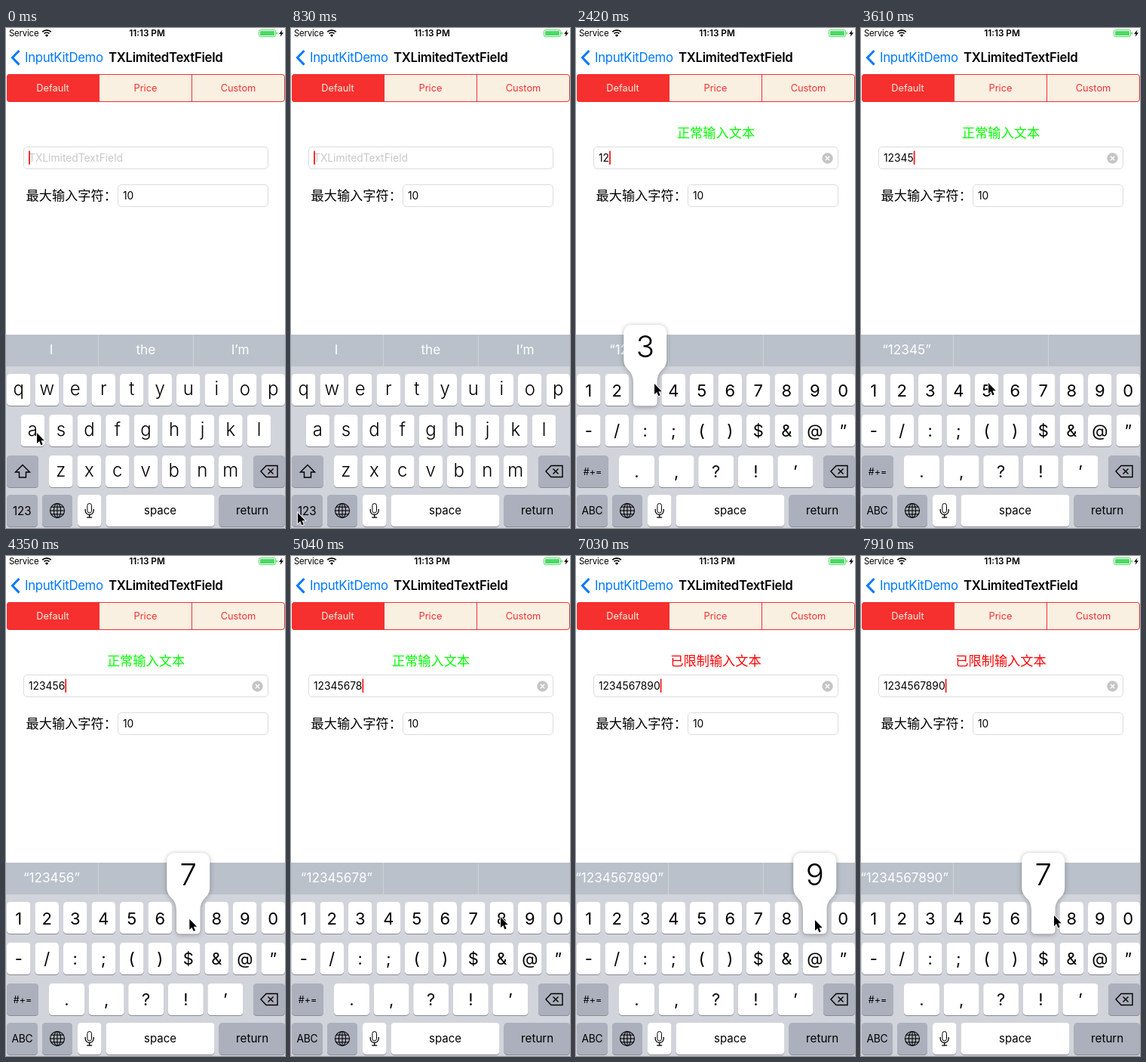
An HTML page with a canvas for the animation above (8 s loop, 370x662 px).

```html
<!DOCTYPE html>
<html lang="en">
<head>
<meta charset="utf-8">
<title>Limited text field</title>
<style>
  html, body { margin: 0; width: 100%; height: 100%; overflow: hidden; background: #fff; }
  canvas { display: block; width: 370px; height: 662px; }
</style>
</head>
<body>
<canvas id="stage"></canvas>
<script>
const W = 370, H = 662, LOOP = 8000;
const canvas = document.getElementById('stage');
const ctx = canvas.getContext('2d');
const dpr = window.devicePixelRatio || 1;
canvas.width = W * dpr;
canvas.height = H * dpr;

const LATIN = 'Inter, sans-serif';
const HAN = '"Noto Sans CJK SC", "Noto Sans CJK", sans-serif';
const RED = '#f5302f', BLUE = '#007aff', INK = '#000';
const SYMBOLS_AT = 1050, LIMIT = 10, KEY_W = 31.5, PITCH = 37.5;

// Key, touch down, touch up
const PRESSES = [
  ['1', 1600, 1700], ['2', 2060, 2180], ['3', 2380, 2520], ['4', 2900, 3020],
  ['5', 3370, 3470], ['6', 3920, 4020], ['7', 4300, 4420], ['8', 4780, 4890],
  ['9', 5330, 5440], ['0', 5780, 5900], ['9', 6900, 7010], ['8', 7340, 7460],
  ['7', 7860, 8100]
];

// Time, x, y of the pointer
const POINTER = [
  [30, 41, 536], [800, 9, 642], [1060, 9, 642], [1540, 22, 490], [1850, 22, 490],
  [2060, 66, 486], [2200, 66, 486], [2380, 104, 471], [2620, 104, 471],
  [2880, 136, 476], [3080, 137, 476], [3350, 169, 470], [3610, 169, 470],
  [3760, 187, 505], [3910, 208, 488], [4060, 208, 488], [4290, 243, 480],
  [4450, 244, 482], [4600, 262, 515], [4770, 278, 478], [5050, 278, 478],
  [5290, 312, 486], [5480, 313, 486], [5760, 349, 478], [6210, 349, 477],
  [6740, 317, 482], [7060, 317, 482], [7320, 286, 484], [7740, 286, 484],
  [7850, 256, 476], [8000, 256, 476]
];

const clamp01 = v => Math.max(0, Math.min(1, v));
const ease = v => { v = clamp01(v); return v * v * (3 - 2 * v); };
const mix = (a, b, p) => a + (b - a) * p;

function setFont(size, weight = 400, family = LATIN, tracking = 0) {
  ctx.font = `${weight} ${size}px ${family}`;
  ctx.letterSpacing = tracking + 'px';
}

function text(str, x, y, size, color = INK, { weight, family, tracking, align = 'center' } = {}) {
  setFont(size, weight, family, tracking);
  ctx.textAlign = align;
  ctx.fillStyle = color;
  ctx.fillText(str, x, y);
}

function box(x, y, w, h, r, fill, stroke) {
  ctx.beginPath();
  ctx.roundRect(x, y, w, h, r);
  if (fill) { ctx.fillStyle = fill; ctx.fill(); }
  if (stroke) { ctx.strokeStyle = stroke; ctx.lineWidth = 1; ctx.stroke(); }
}

function path(points, close) {
  ctx.beginPath();
  points.forEach(([x, y]) => ctx.lineTo(x, y));
  if (close) ctx.closePath();
}

function strokePath(points, color, width, close) {
  path(points, close);
  ctx.strokeStyle = color;
  ctx.lineWidth = width;
  ctx.stroke();
}

function cross(x, y, r, color, width) {
  strokePath([[x - r, y - r], [x + r, y + r]], color, width);
  strokePath([[x + r, y - r], [x - r, y + r]], color, width);
}

function statusBar() {
  text('Service', 4, 11.3, 11.4, INK, { align: 'left', tracking: -0.2 });
  ctx.strokeStyle = INK;
  ctx.lineWidth = 1.7;
  for (const r of [8.2, 5]) {
    ctx.beginPath();
    ctx.arc(54, 11, r, -Math.PI * 0.75, -Math.PI * 0.25);
    ctx.stroke();
  }
  ctx.fillStyle = INK;
  ctx.beginPath();
  ctx.moveTo(54, 11.8);
  ctx.arc(54, 11.8, 3, -Math.PI * 0.75, -Math.PI * 0.25);
  ctx.fill();
  text('11:13 PM', 187, 11.3, 11.8, INK, { weight: 600 });
  box(335.5, 2.5, 22, 9, 2, null, '#4cd964');
  box(337, 4, 19, 6, 0.5, '#4cd964');
  box(358.5, 5.5, 1.5, 3, 0.7, '#4cd964');
  path([[366.5, 2.5], [362, 7.8], [364.7, 7.8], [363.5, 11.8], [368, 6.3], [365.3, 6.3]], true);
  ctx.fillStyle = INK;
  ctx.fill();
}

function navigation() {
  strokePath([[17.5, 30], [8.5, 39.3], [17.5, 48.6]], BLUE, 3);
  text('InputKitDemo', 25, 45, 16.8, BLUE, { align: 'left', tracking: -0.35 });
  text('TXLimitedTextField', 136, 45, 16.8, INK, { align: 'left', weight: 600, tracking: -0.3 });
}

function segments() {
  box(1.5, 61.5, 368, 36, 3.5, '#f9f0e2', RED);
  box(1, 61, 122.5, 37, [4, 0, 0, 4], RED);
  ctx.fillStyle = RED;
  ctx.fillRect(123, 61, 1, 37);
  ctx.fillRect(246, 61, 1, 37);
  ['Default', 'Price', 'Custom'].forEach((name, i) =>
    text(name, 62 + i * 123, 84, 12.8, i ? RED : '#f9f0e2'));
}

function inputState(t) {
  const done = PRESSES.filter(p => p[2] <= t);
  return {
    value: done.slice(0, LIMIT).map(p => p[0]).join(''),
    limited: done.length > LIMIT,
    lastInput: done.length ? done[done.length - 1][2] : -450
  };
}

function caretAlpha(since) {
  const phase = since % 1000;
  return phase < 700 ? 1 - clamp01((phase - 580) / 120) : clamp01((phase - 880) / 120);
}

function form(t) {
  const { value, limited, lastInput } = inputState(t);
  box(23.5, 157.5, 324, 29, 4.5, '#fff', '#dcdcdc');
  box(148.5, 207.5, 199, 29, 4.5, '#fff', '#dcdcdc');
  text('最大输入字符：', 26.5, 228.3, 17.2, INK, { align: 'left', family: HAN });
  text('10', 155, 227, 13.8, INK, { align: 'left' });

  if (value) {
    text(limited ? '已限制输入文本' : '正常输入文本', 185.5, 145.2, 17.2,
      limited ? '#ff0000' : '#00ff00', { family: HAN });
    text(value, 30, 177, 13.8, INK, { align: 'left' });
    ctx.beginPath();
    ctx.arc(333.5, 172.5, 7.2, 0, Math.PI * 2);
    ctx.fillStyle = '#c5c5c8';
    ctx.fill();
    cross(333.5, 172.5, 2.7, '#fff', 1.3);
  } else {
    text('TXLimitedTextField', 30, 177, 13.8, '#c7c7cd', { align: 'left' });
  }

  setFont(13.8);
  const x = 30 + (value ? ctx.measureText(value).width : 0);
  ctx.globalAlpha = caretAlpha(t - lastInput);
  box(x, 162.5, 2, 18.5, 1, RED);
  ctx.globalAlpha = 1;
}

function suggestions(t) {
  ctx.fillStyle = '#bac1ca';
  ctx.fillRect(0, 406, W, 42);
  ctx.fillStyle = '#ced3d9';
  ctx.fillRect(122, 406, 1, 42);
  ctx.fillRect(248, 406, 1, 42);

  const { value } = inputState(t - 120);
  if (!value) {
    ['I', 'the', 'I’m'].forEach((word, i) => text(word, 60 + i * 125.3, 431.5, 17.2, '#fff'));
    return;
  }
  const quoted = `“${value}”`;
  if (value.length < LIMIT) {
    text(quoted, 60.5, 431.5, 17.2, '#fff');
    return;
  }
  // Too long for its slot: faded at the right edge, then scrolled to its end
  setFont(17.2);
  const p = ease((t - 6400) / 360);
  const x = mix(5, 116 - ctx.measureText(quoted).width, p);
  const fade = ctx.createLinearGradient(102, 0, 122, 0);
  fade.addColorStop(0, '#fff');
  fade.addColorStop(1, `rgba(255,255,255,${p})`);
  ctx.save();
  ctx.beginPath();
  ctx.rect(0, 406, 122, 42);
  ctx.clip();
  text(quoted, x, 431.5, 17.2, fade, { align: 'left' });
  ctx.restore();
}

function key(x, y, w, fill = '#fff') {
  box(x, y + 1, w, 42, 4.5, '#898c92');
  box(x, y, w, 42, 4.5, fill);
}

function keyRow(labels, x, y, { w = KEY_W, pitch = PITCH, size = 22, weight = 400, base = 29.5, hidden } = {}) {
  labels.forEach((label, i) => {
    key(x + i * pitch, y, w);
    if (label !== hidden) text(label, x + i * pitch + w / 2, y + base, size, INK, { weight });
  });
}

function globe(x, y) {
  ctx.strokeStyle = INK;
  ctx.lineWidth = 1.1;
  for (const rx of [9.5, 4.6]) {
    ctx.beginPath();
    ctx.ellipse(x, y, rx, 9.5, 0, 0, Math.PI * 2);
    ctx.stroke();
  }
  strokePath([[x, y - 9.5], [x, y + 9.5]], INK, 1.1);
  for (const [dy, r] of [[-4.8, 8.2], [0, 9.5], [4.8, 8.2]])
    strokePath([[x - r, y + dy], [x + r, y + dy]], INK, 1.1);
}

function microphone(x, y) {
  box(x - 2.8, y - 9.5, 5.6, 12.5, 2.8, null, INK);
  ctx.beginPath();
  ctx.moveTo(x - 5.5, y - 2);
  ctx.lineTo(x - 5.5, y);
  ctx.arc(x, y, 5.5, Math.PI, 0, true);
  ctx.lineTo(x + 5.5, y - 2);
  ctx.lineWidth = 1.3;
  ctx.stroke();
  strokePath([[x, y + 5.5], [x, y + 9]], INK, 1.3);
  strokePath([[x - 3.5, y + 9], [x + 3.5, y + 9]], INK, 1.3);
}

function keyboard(t, pressed) {
  const symbols = t >= SYMBOLS_AT;
  const gray = '#abb0bc';
  ctx.fillStyle = '#d1d4da';
  ctx.fillRect(0, 448, W, H - 448);

  if (symbols) {
    keyRow([...'1234567890'], 1, 458, { hidden: pressed });
    keyRow([...'-/:;()$&@”'], 1, 512, { base: 28.5 });
    keyRow([...'.,?!’'], 57, 566, { w: 47, pitch: 52.6, base: 28.5 });
  } else {
    const letters = { size: 24, weight: 300, base: 28 };
    keyRow([...'qwertyuiop'], 1, 458, letters);
    keyRow([...'asdfghjkl'], 19.7, 512, letters);
    keyRow([...'zxcvbnm'], 57, 566, letters);
  }

  key(1, 566, 42, gray);
  if (symbols) {
    text('#+=', 22, 591.5, 12.5);
  } else {
    strokePath([[22, 578.5], [31.5, 588], [26.5, 588], [26.5, 595], [17.5, 595], [17.5, 588], [12.5, 588]],
      INK, 1.4, true);
  }
  key(328, 566, 42, gray);
  strokePath([[338, 587], [345, 579.5], [360, 579.5], [360, 594.5], [345, 594.5]], INK, 1.4, true);
  cross(351, 587, 3.5, INK, 1.4);

  key(1, 618, 41, gray);
  if (symbols) text('ABC', 21.3, 644, 13.8, INK, { tracking: -0.3 });
  else text('123', 21.3, 644.5, 15.2);
  key(48, 618, 40, gray);
  globe(68, 639);
  key(95, 618, KEY_W);
  microphone(110.7, 639);
  key(132.5, 618, 144);
  text('space', 204.5, 643.5, 15);
  key(282.5, 618, 87.5, gray);
  text('return', 326.7, 643.5, 15.2);
}

function popup(char) {
  const left = 1 + '1234567890'.indexOf(char) * PITCH, right = left + KEY_W;
  const mid = Math.max(29.5, Math.min(340.5, left + KEY_W / 2));
  const l = mid - 28.5, r = mid + 28.5;
  ctx.beginPath();
  ctx.moveTo(l, 403);
  ctx.arcTo(l, 393, mid, 393, 10);
  ctx.arcTo(r, 393, r, 410, 10);
  ctx.lineTo(r, 438);
  ctx.bezierCurveTo(r, 455, right, 450, right, 470);
  ctx.lineTo(right, 496);
  ctx.arcTo(right, 500.5, left + 16, 500.5, 4.5);
  ctx.arcTo(left, 500.5, left, 480, 4.5);
  ctx.lineTo(left, 470);
  ctx.bezierCurveTo(left, 450, l, 455, l, 438);
  ctx.closePath();
  ctx.save();
  ctx.shadowColor = 'rgba(0,0,0,.3)';
  ctx.shadowBlur = 6 * dpr;
  ctx.shadowOffsetY = dpr;
  ctx.fillStyle = '#fff';
  ctx.fill();
  ctx.restore();
  text(char, mid, 435.5, 40, INK, { weight: 300 });
}

function pointer(t) {
  const next = POINTER.findIndex(p => p[0] > t);
  const b = POINTER[next < 0 ? POINTER.length - 1 : next];
  const a = POINTER[Math.max(0, next - 1)];
  const p = a === b ? 0 : ease((t - a[0]) / (b[0] - a[0]));
  ctx.save();
  ctx.translate(mix(a[1], b[1], p), mix(a[2], b[2], p));
  path([[0, 0], [0, 14], [3.2, 11], [5.4, 16.2], [7.7, 15.2], [5.5, 10.2], [9.8, 10.2]], true);
  ctx.strokeStyle = '#fff';
  ctx.lineWidth = 1.8;
  ctx.stroke();
  ctx.fillStyle = INK;
  ctx.fill();
  ctx.restore();
}

function draw(t) {
  ctx.setTransform(dpr, 0, 0, dpr, 0, 0);
  ctx.fillStyle = '#fff';
  ctx.fillRect(0, 0, W, H);
  statusBar();
  navigation();
  segments();
  form(t);
  suggestions(t);
  const press = PRESSES.find(p => t >= p[1] && t < p[2] + 60);
  keyboard(t, press && press[0]);
  if (press) popup(press[0]);
  pointer(t);
}

function frame(now) {
  draw(now % LOOP);
  requestAnimationFrame(frame);
}
requestAnimationFrame(frame);
</script>
</body>
</html>
```
